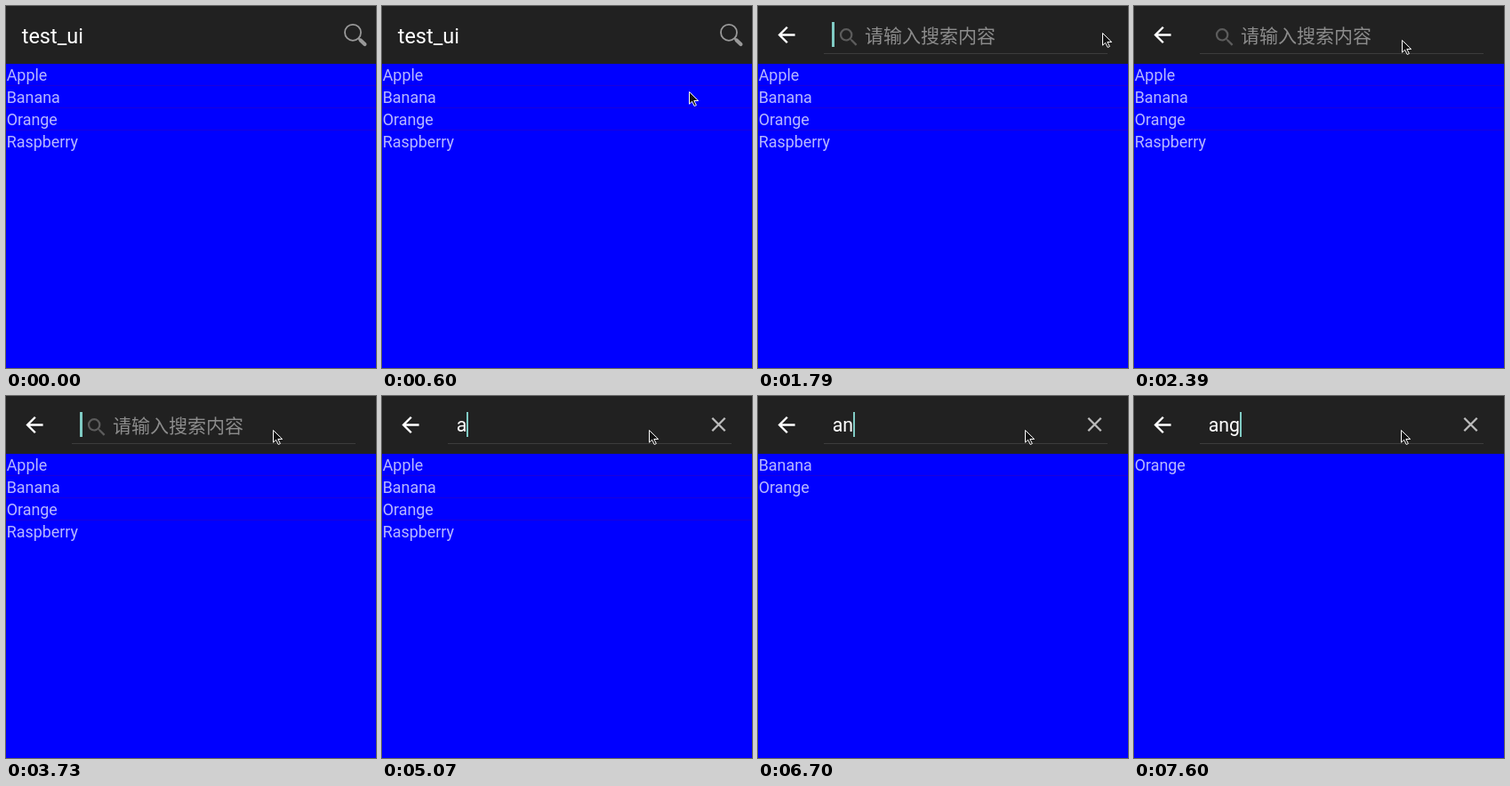
Recreate the animation shown at these times as an HTML page. Size 416 px wide and 407 px high, loop 8 s.

```html
<!DOCTYPE html>
<html lang="en">
<head>
<meta charset="utf-8">
<title>Search filter</title>
<style>
  html, body { margin: 0; width: 100%; height: 100%; overflow: hidden; background: #00f; }
  svg { display: block; width: 416px; height: 407px; }
  text { font-family: Roboto, "Noto Sans CJK SC", "Noto Sans CJK", sans-serif; white-space: pre; }
  #list text { font-size: 17.9px; fill: #b8b8ff; }
  #list rect { fill: #1a00dc; }
</style>
</head>
<body>
<svg viewBox="0 0 416 407">
  <rect width="416" height="407" fill="#00f"/>
  <rect width="416" height="65" fill="#212121"/>
  <g id="list"></g>

  <g id="titleBar">
    <text x="17.7" y="42" font-size="23.5" fill="#fff">test_ui</text>
    <path d="M396 36L399 39" stroke="#999" stroke-width="2"/>
    <path d="M398.6 38.4L403.4 43" stroke="#999" stroke-width="4.2" stroke-linecap="round"/>
    <circle cx="390" cy="29.8" r="9" fill="none" stroke="#999" stroke-width="1.8"/>
  </g>

  <g id="searchBar">
    <path transform="translate(17.6 18.1) scale(1.2)" fill="#fff"
      d="M20 11H7.83l5.59-5.59L12 4l-8 8 8 8 1.41-1.41L7.83 13H20z"/>
    <rect x="74" y="53" width="319" height="1" fill="#3c3c3c"/>
    <g id="hint">
      <path transform="translate(88.5 21.7) scale(1.12)" fill="#5c5c5c"
        d="M15.5 14h-.79l-.28-.27A6.47 6.47 0 0 0 16 9.5 6.5 6.5 0 1 0 9.5 16c1.61 0 3.09-.59 4.23-1.57l.27.28v.79l5 4.99L20.49 19zm-6 0a4.5 4.5 0 1 1 0-9 4.5 4.5 0 0 1 0 9z"/>
      <text x="120" y="41" font-size="21" fill="#8c8c8c">请输入搜索内容</text>
    </g>
    <text id="query" x="83.7" y="40" font-size="21.3" fill="#fff"></text>
    <path id="clear" d="M371.3 24.8l14.4 14.4m0-14.4l-14.4 14.4" stroke="#bcbcbc" stroke-width="2.3"/>
    <rect id="caret" y="18" height="28" fill="#80cbc4"/>
  </g>

  <path id="pointer" d="M.5 .5V14.2l3.1-2.9 2.6 5.2 2.2-1-2.6-5h4.9z" fill="#111" stroke="#fff"/>
</svg>
<script>
const LOOP = 8000, OPEN = 1790;
const fruits = ["Apple", "Banana", "Orange", "Raspberry"];

// [time, x, y]
const moves = [
  [450, 350, 118], [600, 345, 96], [750, 357, 63], [890, 378, 41], [1040, 387, 30],
  [2090, 359, 32], [2240, 316, 35], [2390, 301, 38], [2530, 300, 38]
];
// [time, typed text, caret x]
const typing = [[OPEN, "", 83], [4180, "a", 95], [5810, "an", 107], [7600, "ang", 119]];
// the caret flips at each of these times, starting visible
const blinks = [2240, 2680, 3280, 3730, 4620, 5070, 5670, 5810, 6260, 6700, 7300, 7600];

const $ = id => document.getElementById(id);
const latest = (steps, t) => steps.filter(s => s[0] <= t).pop();
const show = (el, on) => el.setAttribute("visibility", on ? "visible" : "hidden");

let listed = null;
function drawList(query) {
  if (query === listed) return;
  listed = query;
  $("list").innerHTML = fruits
    .filter(name => name.toLowerCase().includes(query))
    .map((name, i) =>
      (i ? `<rect y="${64 + 25 * i}" width="416" height="1"/>` : "") +
      `<text x="0.7" y="${84.4 + 25 * i}">${name}</text>`)
    .join("");
}

function render(t) {
  const open = t >= OPEN;
  const [, query, caretX] = latest(typing, t) || typing[0];
  const spot = latest(moves, t);
  const caretOn = blinks.filter(b => b <= t).length % 2 === 0;

  drawList(query);
  show($("titleBar"), !open);
  $("searchBar").style.display = open ? "" : "none";
  show($("hint"), !query);
  show($("clear"), query);
  show($("caret"), caretOn);
  $("query").textContent = query;
  $("caret").setAttribute("x", caretX);
  $("caret").setAttribute("width", query ? 2 : 3);

  show($("pointer"), spot);
  if (spot) $("pointer").setAttribute("transform", `translate(${spot[1]} ${spot[2]})`);
}

const start = performance.now();
function frame() {
  render((performance.now() - start) % LOOP);
  requestAnimationFrame(frame);
}
frame();
</script>
</body>
</html>
```
